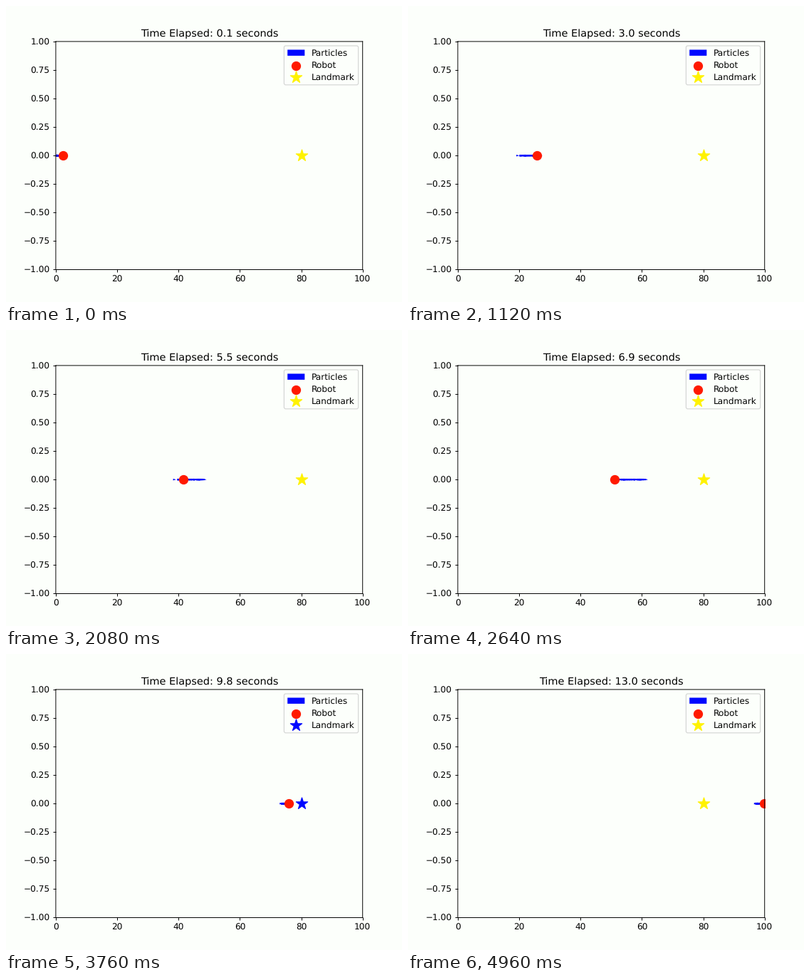
Write a matplotlib script that moves like this. It is 556 px wide and 416 px high and loops after 5040 ms.

```python
import numpy as np
import matplotlib.pyplot as plt
from matplotlib.animation import FuncAnimation

W, H, DPI = 556, 416, 86.875
FRAMES, INTERVAL = 63, 80
BG, BLUE, RED, YELLOW = "#fcfffb", "#0008ff", "#ff1a00", "#fff200"
LANDMARK, SENSOR_RANGE = 80, 20
START, SPEED = 2.3, 1.572
DRIFT = [-1.05, 0.8, 2.0, -0.45, 0.3]  # sine amplitudes, one per harmonic
ARROW = 1.0

plt.rcParams.update({"font.family": "DejaVu Sans", "path.snap": False,
                     "text.hinting": "none"})

rng = np.random.default_rng(4)
spread = rng.beta(2.0, 1.8, 90)
spread = (spread - spread.min()) / np.ptp(spread) - 0.5
rows = np.zeros_like(spread)


def steady_x(frame):
    return START + SPEED * frame


def robot_x(frame):
    """Steady travel plus a slow wander that vanishes at both ends."""
    phase = np.pi * frame / (FRAMES - 1)
    wander = sum(a * np.sin(n * phase) for n, a in enumerate(DRIFT, 1))
    return steady_x(frame) + wander


def cloud_x(frame, x):
    """Particles spread out while blind and tighten once the landmark is seen."""
    if x < LANDMARK - SENSOR_RANGE:
        lag, length = 2.1 - 0.0031 * frame ** 2, 1 + 1.75 * np.sqrt(frame)
    else:
        lag, length = 1.75, 3
    return steady_x(frame) - lag + length * spread


nudge = 1e-6  # keeps the pixel size from rounding down
fig = plt.figure(figsize=((W + nudge) / DPI, (H + nudge) / DPI),
                 dpi=DPI, facecolor=BG)
left, right, top, bottom = 69.9, 500.7, 49.9, 370.5
ax = fig.add_axes([left / W, 1 - bottom / H,
                   (right - left) / W, (bottom - top) / H], facecolor=BG)
ax.set_xlim(0, 100)
ax.set_ylim(-1, 1)

particles = ax.quiver(spread, rows, rows + ARROW, rows, color=BLUE,
                      scale=1, scale_units="x", width=0.002,
                      label="Particles")
robot = ax.scatter([0], [0], s=100, color=RED, label="Robot")
landmark = ax.scatter([LANDMARK], [0], s=200, marker="*", color=YELLOW,
                      label="Landmark")
legend = ax.legend(loc="upper right", facecolor=BG, labelspacing=0.43)
legend_star = legend.legend_handles[2]
title = ax.set_title("")


def update(frame):
    x = robot_x(frame)
    robot.set_offsets([[x, 0]])
    particles.set_offsets(np.column_stack([cloud_x(frame, x), rows]))

    seen = 0 < LANDMARK - x < SENSOR_RANGE
    for star in (landmark, legend_star):
        star.set_color(BLUE if seen else YELLOW)
    title.set_text(f"Time Elapsed: {0.118 + 0.207 * frame:.1f} seconds")
    return particles, robot, landmark, title


anim = FuncAnimation(fig, update, frames=FRAMES, interval=INTERVAL,
                     repeat=True, repeat_delay=0, blit=False)
plt.show()
```
